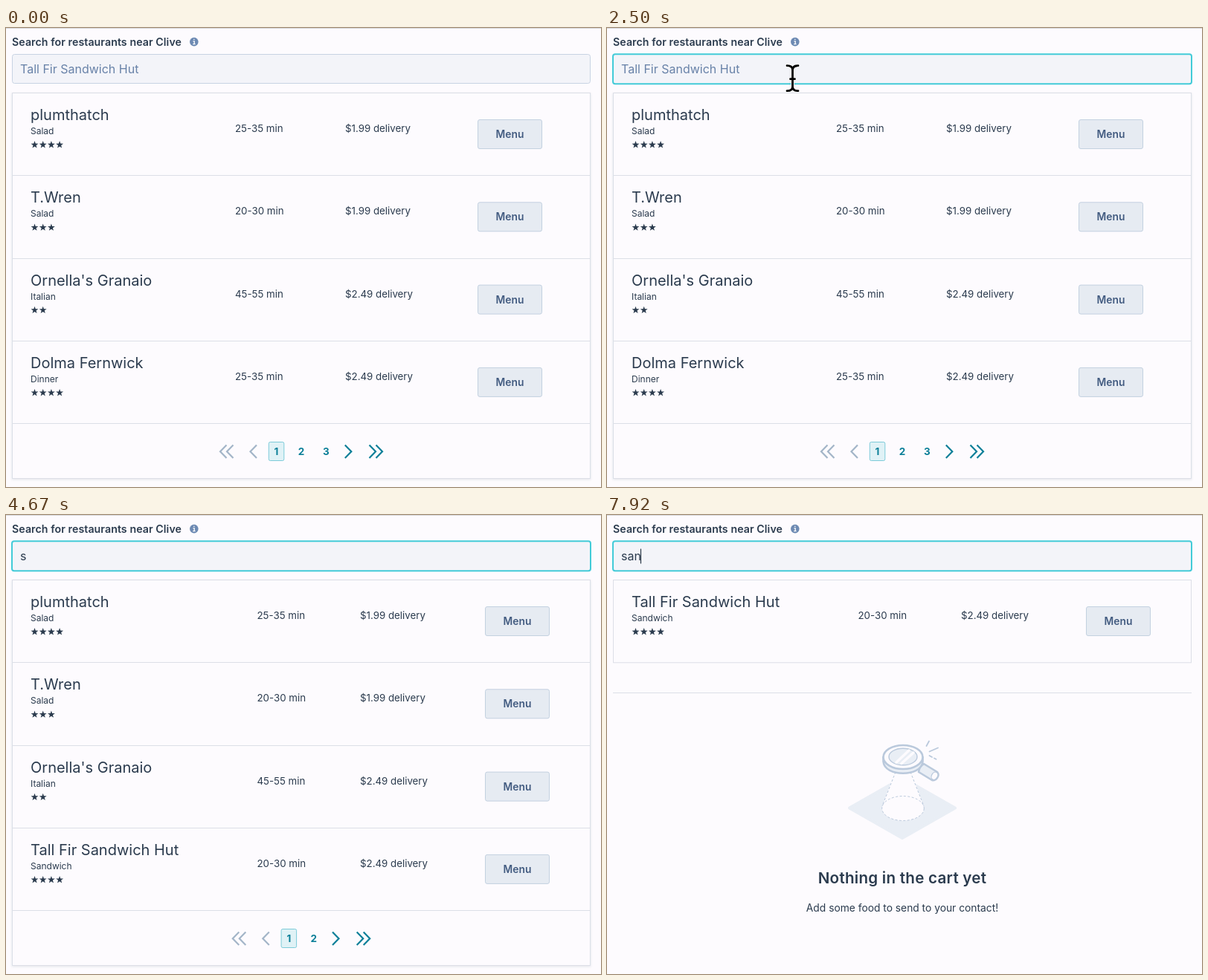
These frames come from a looping animation (800x618 px, 8000 ms). An HTML page:

```html
<!DOCTYPE html>
<html lang="en">
<head>
<meta charset="utf-8">
<title>Restaurant search</title>
<style>
html, body { margin: 0; width: 100%; height: 100%; overflow: hidden; background: #fdfbfe; }
svg { display: block; width: 800px; height: 618px; }
text { font-family: Inter, "Open Sans", sans-serif; font-size: 13.3px; fill: #2b3b4e; white-space: pre; }
.label { font-size: 14.2px; font-weight: 600; letter-spacing: .07px; }
.input { font-size: 16px; }
.hint { fill: #6882a8; }
.name { font-size: 20px; }
.kind { font-size: 12px; }
.menu { font-size: 13.8px; font-weight: 600; fill: #425b80; text-anchor: middle; }
.page { font-size: 13.5px; font-weight: 700; fill: #0b7f98; text-anchor: middle; }
.title { font-size: 20.6px; font-weight: 600; letter-spacing: .25px; text-anchor: middle; }
.note { font-size: 13.8px; text-anchor: middle; }
.arrow { fill: none; stroke: #0b7f98; stroke-width: 2.2; }
.off { stroke: #a3b5c8; }
.rule { fill: none; stroke: #dcdfe7; }
.art { stroke: #bac9dc; stroke-linecap: round; stroke-linejoin: round; }
.dash { fill: #fdfbfe; stroke: #bac9dc; stroke-dasharray: 3 2.4; }
.beam { fill: none; stroke: #000; stroke-width: 2.8; stroke-linecap: round; }
.halo { stroke: #fff; stroke-width: 4.4; }
</style>
</head>
<body>
<svg viewBox="0 0 800 618">
  <defs>
    <filter id="soft" x="-5%" y="-5%" width="110%" height="110%">
      <feDropShadow dx="0" dy="1" stdDeviation="1.5" flood-color="#33475b" flood-opacity=".13"/>
    </filter>
  </defs>
  <path d="M0 .5H800" stroke="#d9d9de"/>
  <text class="label" x="8" y="24">Search for restaurants near Clive</text>
  <circle cx="252.8" cy="18.6" r="5.8" fill="#6d8ab3"/>
  <path d="M251.5 17.8H253.2V21.6M251.2 21.7H254.6M252.1 15.4H253.5" fill="none" stroke="#fff" stroke-width="1.3"/>
  <g id="list"></g>
  <g id="field"></g>
  <path id="caret" d="M0 45.5V65.5" stroke="#1f2d3d" stroke-width="1.1"/>
  <g id="cursor"></g>
</svg>
<script>
const $ = id => document.getElementById(id);
const LOOP = 8000, ROW = 111.3;
const FOCUS = 2000, TYPED = [4670, 4917, 5917];
const WORD = "san", CARET_X = [19.5, 27.5, 35.5, 45.5];

const leaf = ["plumthatch", "Salad", 4, "25-35", "1.99"];
const wren = ["T.Wren", "Salad", 3, "20-30", "1.99"];
const pasta = ["Ornella's Granaio", "Italian", 2, "45-55", "2.49"];
const dolma = ["Dolma Fernwick", "Dinner", 4, "25-35", "2.49"];
const fir = ["Tall Fir Sandwich Hut", "Sandwich", 4, "20-30", "2.49"];
const rye = ["Nook & Rye", "Sandwich", 3, "25-35", "1.99"];

// one view per number of typed letters
const views = [
  { rows: [leaf, wren, pasta, dolma], pages: 3, cols: [308, 456, 634] },
  { rows: [leaf, wren, pasta, fir], pages: 2 },
  { rows: [leaf, wren, fir, rye] },
  { rows: [fir] },
];

const text = (cls, x, y, s) =>
  `<text class="${cls}" x="${x}" y="${y}">${s.replace("&", "&amp;")}</text>`;

function star(cx, cy) {
  const pts = Array.from({ length: 10 }, (_, i) => {
    const r = i % 2 ? 2.1 : 5.2, a = i * Math.PI / 5;
    return `${(cx + r * Math.sin(a)).toFixed(2)},${(cy - r * Math.cos(a)).toFixed(2)}`;
  });
  return `<polygon points="${pts.join(" ")}" fill="#2b3b4e"/>`;
}

function row([name, kind, stars, mins, price], i, [x1, x2, x3]) {
  let s = `<g transform="translate(0 ${i * ROW})">`;
  s += text("name", 33, 124, name) + text("kind", 33, 143, kind);
  for (let k = 0; k < stars; k++) s += star(38.5 + 11.2 * k, 157.3);
  s += text("", x1, 140, mins + " min") + text("", x2, 140, `$${price} delivery`);
  s += `<rect x="${x3 + .5}" y="123.5" width="86" height="39" rx="2.5" fill="#e6ebf2" stroke="#c3d1e0"/>`;
  return s + text("menu", x3 + 43.5, 148, "Menu") + "</g>";
}

// chevron with its tip at x, dir -1 points left
const chevron = (x, dir, cls = "") =>
  `<path class="arrow ${cls}" d="M${x - 8.5 * dir} 561.5L${x} 570.2L${x - 8.5 * dir} 579"/>`;

function pager(n) {
  const d = (3 - n) * 16.8;
  let s = chevron(288 + d, -1, "off") + chevron(297 + d, -1, "off") + chevron(328.5 + d, -1, "off");
  s += `<rect x="${353.3 + d}" y="557.5" width="20.5" height="25" rx="2" fill="#e0f2f6" stroke="#7ccbd9"/>`;
  for (let k = 0; k < n; k++) s += text("page", 363.5 + d + 33.4 * k, 575, `${k + 1}`);
  return s + chevron(464.3 - d, 1) + chevron(497 - d, 1) + chevron(506 - d, 1);
}

const emptyCart = dy => `<g transform="translate(0 ${dy})">
  <path class="rule" d="M8 239.5H786"/>
  <path d="M326 394.5L397 354L468 394.5L397 435Z" fill="#e9eef5" stroke="#e9eef5" stroke-width="4" stroke-linejoin="round"/>
  <path d="M388 344L370 392Q398 420 426 392L408 344Z" fill="#fdfbfe"/>
  <ellipse class="dash" cx="398" cy="395" rx="28.3" ry="16.5"/>
  <path class="dash" d="M388 346L370 392M408 346L426 392"/>
  <g class="art" stroke-width="2.6" fill="#e9eef5">
    <path d="M420 337L428 342" stroke-width="9"/>
    <path d="M426 335L444 346Q447 350 444 354Q441 358 437 357L419 346Q420 338 426 335Z"/>
    <ellipse cx="440.5" cy="351" rx="4" ry="5.5" transform="rotate(28 440 351)" fill="#fdfbfe" stroke-width="1.2"/>
    <path d="M371.5 326V332C373 353 423 353 424.5 332V326Z"/>
    <ellipse cx="398" cy="326" rx="26.5" ry="16" fill="#fdfbfe"/>
    <ellipse cx="398" cy="325.5" rx="19" ry="11.3" stroke-width="1.4"/>
    <path d="M389 333L406 317M396 334.5L412 320" fill="none" stroke="#fdfbfe" stroke-width="3.5"/>
    <path d="M429.5 311L433 304.5M433.5 318.5L445 313.5M433.5 324L437 326M440 327.5L442.5 328.8" fill="none" stroke-width="1.8"/>
  </g>
  ${text("title", 397, 496, "Nothing in the cart yet")}
  ${text("note", 397, 534, "Add some food to send to your contact!")}
</g>`;

function list({ rows, pages, cols = [337.5, 476, 644] }) {
  const n = rows.length, height = pages ? 519 : n * ROW;
  let s = `<rect class="rule" x="8.5" y="87.5" width="777" height="${height}" style="fill:#fdfbfe" ${pages ? 'filter="url(#soft)"' : ""}/>`;
  for (let i = 1; i < n + !!pages; i++) s += `<path class="rule" d="M9 ${Math.round(i * ROW + 87) + .5}H785"/>`;
  s += rows.map((r, i) => row(r, i, cols)).join("");
  return s + (pages ? pager(pages) : emptyCart((n - 1) * ROW));
}

function field(count, focused) {
  const box = focused
    ? 'x="8" y="35.3" width="778" height="40" stroke="#43cbd8" stroke-width="2"'
    : 'x="8.5" y="35.5" width="777" height="39" stroke="#c8d3e3"';
  return `<rect ${box} rx="3" fill="#f3f4f9"/>` +
    (count ? text("input", 19, 61, WORD.slice(0, count)) : text("input hint", 19, 61, "Tall Fir Sandwich Hut"));
}

const beam = "M-7.5 -17Q0 -17 0 -11Q0 -17 7.5 -17M0 -12V12M-7.5 17Q0 17 0 11Q0 17 7.5 17M-3 1H3";
$("cursor").innerHTML = `<path class="beam halo" d="${beam}"/><path class="beam" d="${beam}"/>`;

function caretOn(t, count) {
  if (t < FOCUS) return false;
  if (count === 1 && t < TYPED[0] + 80) return false;
  const since = count ? TYPED[count - 1] : FOCUS;
  return (t - since) % 1000 < 500;
}

function moveCursor(t) {
  const p = Math.min(1, Math.max(0, (t - 1200) / 500));
  const left = (1 - p) ** 3;
  const x = 249.5 + 45 * left, y = (t < FOCUS ? 68.5 : 67.7) - 95 * left;
  $("cursor").setAttribute("transform", `translate(${x} ${y})`);
  $("cursor").style.display = p > 0 && t < TYPED[0] ? "" : "none";
}

let shown = "", start = performance.now();
function draw(now) {
  const t = Math.max(0, now - start) % LOOP;
  const count = TYPED.filter(at => t >= at).length, focused = t >= FOCUS;
  const key = count + "/" + focused;
  if (key !== shown) {
    shown = key;
    $("list").innerHTML = list(views[count]);
    $("field").innerHTML = field(count, focused);
    $("caret").setAttribute("transform", `translate(${CARET_X[count]} 0)`);
  }
  $("caret").style.display = caretOn(t, count) ? "" : "none";
  moveCursor(t);
  requestAnimationFrame(draw);
}
draw(start);
</script>
</body>
</html>
```
